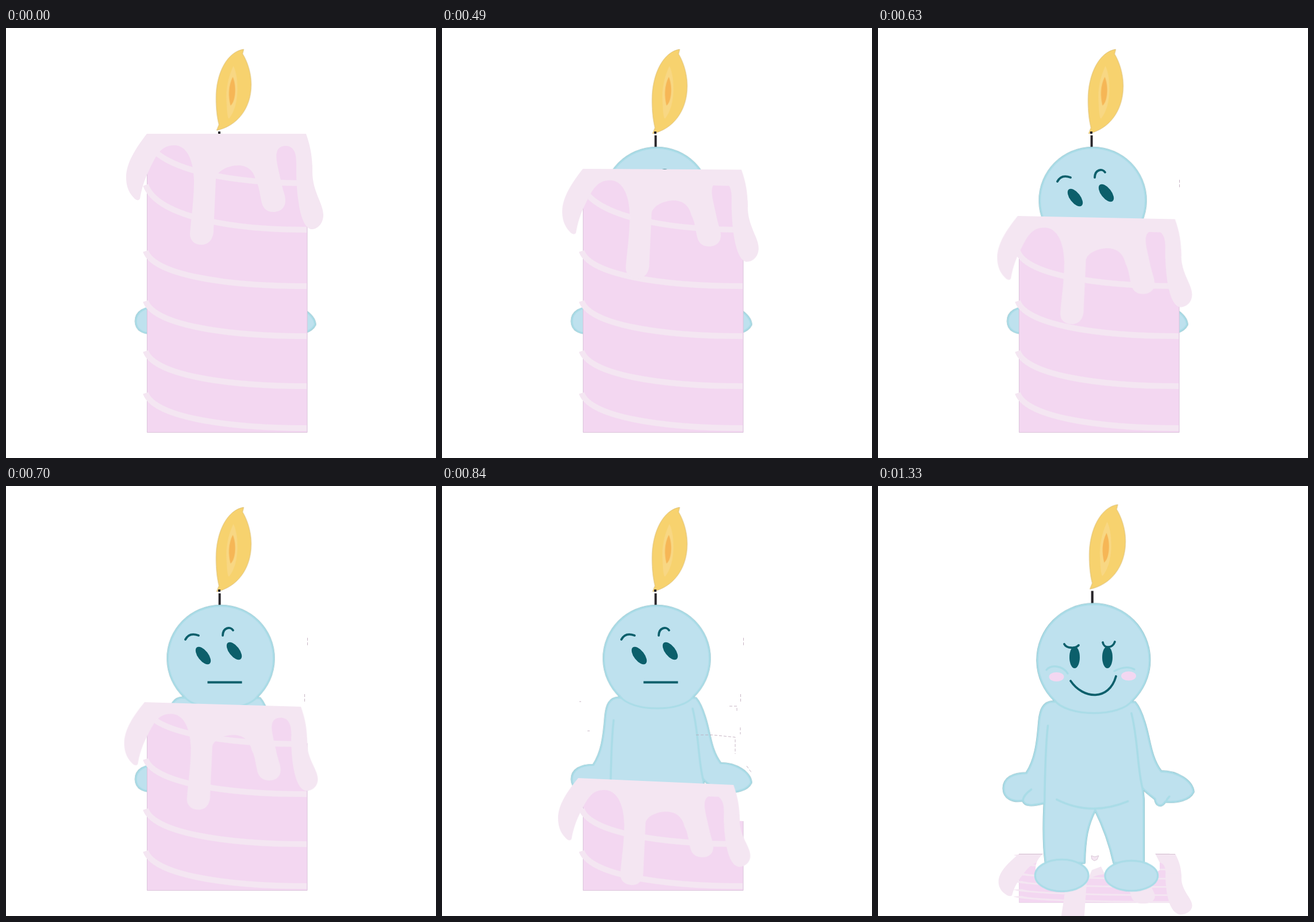
An HTML page that plays this animation: 748x748 px, repeating every 1.82 s.

```html
<!DOCTYPE html>
<html lang="en">
<head>
<meta charset="utf-8">
<title>Melting candle</title>
<style>
html, body { margin: 0; width: 100%; height: 100%; overflow: hidden; background: #fff; }
svg { display: block; width: 100vw; height: 100vh; }

.skin { fill: #bee1ee; stroke: #a9dce7; stroke-width: 3; stroke-linejoin: round; }
.edge { fill: none; stroke: #86b4bf; stroke-width: 4; stroke-linejoin: round; }
.line { fill: none; stroke: #a9dce7; stroke-width: 3.4; stroke-linecap: round; }
.ink { fill: #0c5f6b; }
.pen { fill: none; stroke: #0c5f6b; stroke-width: 3.8; stroke-linecap: round; }
.wax { fill: #f4e6f2; }
.stripes { fill: none; stroke: #f4e6f2; stroke-width: var(--band, 10px); }
.puddle { --band: 17px; }
.speck { fill: none; stroke: #b9a3b5; stroke-width: .8; stroke-dasharray: 5 3; }

/* Every pose is held, then switched at once. */
.anim { animation: 1820ms step-end infinite; }
.melt { animation-name: melt; }
.drip { animation-name: drip; transform-origin: 0 56px; }
.figure { animation-name: figure; }
.flame { animation-name: flame; }
.tongue { animation-name: tongue; transform-origin: 0 34px; }
.early { animation-name: early; }
.late { animation-name: late; }
.mid { animation-name: mid; }
.end { animation-name: end; }
.s1 { animation-name: s1; }
.s2 { animation-name: s2; }
.s3 { animation-name: s3; }

@keyframes melt {
  0%     { transform: translate(245px, 184px); }
  23.07% { transform: translate(245px, 212px) matrix(1, 0, 0, .995, 0, 0); }
  26.92% { transform: translate(245px, 245px) matrix(.996, .005, 0, .985, 0, 0); }
  30.76% { transform: translate(245px, 283px) matrix(.992, .011, 0, .975, 0, 0); }
  34.61% { transform: translate(243px, 327px) matrix(.988, .02, 0, .965, 0, 0); }
  38.46% { transform: translate(241px, 376px) matrix(.982, .029, 0, .955, 0, 0); }
  42.3%  { transform: translate(239px, 437px) matrix(.978, .036, 0, .95, 0, 0); }
  46.15%, 100% { transform: translate(237px, 508px) matrix(.975, .043, 0, .943, 0, 0); }
}
@keyframes drip {
  0%     { transform: none; }
  23.07% { transform: scaleY(.97); }
  30.76% { transform: scaleY(.93); }
  38.46% { transform: scaleY(.88); }
  46.15%, 100% { transform: scaleY(.86); }
}
@keyframes figure {
  0%     { transform: matrix(.974, 0, 0, .968, 6.3, 12.4); }
  50%    { transform: none; }
  73.07%, 100% { transform: matrix(1.031, 0, 0, 1.028, -13.9, -2.6); }
}
@keyframes flame {
  0%     { transform: translate(-4.5px, 3px); }
  50%    { transform: none; }
  73.07%, 100% { transform: matrix(1.031, 0, 0, 1.028, -13.9, -2.6); }
}
@keyframes tongue {
  0%     { transform: scaleY(.986); }
  23.07% { transform: scaleY(1.025); }
  50%, 100% { transform: none; }
}
@keyframes early { 0% { opacity: 1; } 50%, 100% { opacity: 0; } }
@keyframes late  { 0% { opacity: 0; } 50%, 100% { opacity: 1; } }
@keyframes mid   { 0% { opacity: 0; } 50% { opacity: 1; } 73.07%, 100% { opacity: 0; } }
@keyframes end   { 0% { opacity: 0; } 73.07%, 100% { opacity: 1; } }
@keyframes s1    { 0% { opacity: 0; } 30.76% { opacity: 1; } 50%, 100% { opacity: 0; } }
@keyframes s2    { 0% { opacity: 0; } 38.46% { opacity: 1; } 50%, 100% { opacity: 0; } }
@keyframes s3    { 0% { opacity: 0; } 46.15% { opacity: 1; } 50%, 100% { opacity: 0; } }
</style>
</head>
<body>
<svg viewBox="0 0 748 748">
  <defs>
    <path id="long" d="M243 273C262 325 380 351 523 351"/>
    <path id="short" d="M243 388C256 428 375 449 523 449"/>
    <g id="column">
      <path d="M245.5 184H524V703.5H245.5Z" fill="#f3d7f1" stroke="#d8c1d8" stroke-width=".9"/>
      <g class="stripes">
        <use href="#long" y="-81"/>
        <use href="#long"/>
        <use href="#short"/>
        <use href="#short" y="87"/>
        <use href="#short" y="174"/>
        <use href="#short" y="247"/>
      </g>
    </g>
    <!-- wax pieces are placed relative to the top left corner of the candle -->
    <path id="cap" class="wax" transform="translate(-245 -184)" d="M245 184H522C530 207 533 225 533 250L505 256C505 235 506 220 500 212C495 203 480 203 474 210C466 220 473 240 478 265C482 285 486 290 486 300C486 314 476 320 465 320C452 320 446 312 444 300C441 285 440 275 435 266C431 248 420 239 404 239C385 239 366 250 365 262C364 290 362 330 361 355C359 371 350 377 340 377C328 377 320 370 320 358C322 330 327 300 327 265C326 225 312 204 293 204C270 204 262 220 250 245C240 265 236 280 233 297C231 301 226 300 222 295C212 285 209 272 209 260C209 235 225 210 245 184Z"/>
    <path id="tail" class="wax" transform="translate(-245 -184)" d="M505 238H532.5L533 250C533 285 552 305 552 325C552 342 540 351 530 350C512 345 506 295 505 255Z"/>
    <path id="torso" d="M308 367.5C293 368.5 287.5 380 285.5 400C282.5 440 278.5 466 264 488.5C241 488.5 225.5 497 225.5 514C225.5 531 241 537.5 258 534.5C261 543.5 272 544.5 294.5 538.5C292.5 580 292.5 610 296.5 640H361.5C362.5 598 366.5 577 380 550.5C393 577 403.5 603 411.5 640H461.5V533L459.5 513C466 521 474 526 481 532C483 544 491 547 498 536.5C519 538.5 539 533.5 545.5 520C543.5 501.5 519 485.5 491 485.5C472.5 461 472.5 431 462.5 401C458.5 388 453.5 376 447 368.5Z"/>
    <path id="head" d="M311.4 365A94.5 94.5 0 1 1 442.6 365C424 394 332 394 311.4 365Z"/>
    <clipPath id="below">
      <path class="anim melt" d="M0 3H276L286 66H300V900H-10V70H0Z"/>
    </clipPath>
  </defs>

  <!-- melted puddle -->
  <g class="anim late puddle">
    <use href="#column" transform="translate(245 640) scale(.94 .163) translate(-245 -184)"/>
    <g transform="translate(245 640) scale(.982 .635)">
      <use href="#cap"/>
      <use href="#tail"/>
    </g>
    <path d="M245 640.5H517" stroke="#cdb9ca" stroke-width=".8"/>
  </g>
  <g class="anim end">
    <path fill="#fff" d="M288 639C278 648 274 655 274 668L290 690H355L367 680L372 668L388 662L394 674L420 680H480L487 670L490 668V655L482 639Z"/>
    <path class="wax" stroke="#cdb9ca" stroke-width=".7" d="M371 643L377 645L384 643L381 650L376 652L372 649Z"/>
  </g>

  <g class="anim figure">
    <path d="M375 180V203" stroke="#262328" stroke-width="4"/>
    <use class="edge" href="#torso"/>
    <use class="edge" href="#head"/>
    <use class="skin" href="#torso"/>
    <path class="line" d="M300 408C296 445 295 490 294.5 538M441 387C452 430 451 480 459.5 513M315 533Q372 562 435 536M272 516Q258 526 258 535M505 528Q501 532 499 537"/>
    <ellipse class="skin" cx="323.5" cy="661.5" rx="45" ry="27"/>
    <ellipse class="skin" cx="441" cy="662" rx="44.5" ry="25.5"/>
    <use class="skin" href="#head"/>
  </g>

  <!-- sideways glance -->
  <g class="anim early">
    <path class="pen" d="M312 267Q319 254 335 260M377 260C377 247 390 243 395 251"/>
    <ellipse class="ink" rx="9" ry="18" transform="translate(343 295) rotate(-38)"/>
    <ellipse class="ink" rx="9" ry="18" transform="translate(397 287) rotate(-38)"/>
    <path d="M350.5 341.5H410.5" stroke="#0c5f6b" stroke-width="3.8"/>
  </g>

  <!-- straight face -->
  <g class="anim mid">
    <path class="pen" d="M326 253Q338 239 351 251M388 250C391 237 408 238 408 249"/>
    <ellipse class="ink" cx="345" cy="292.5" rx="9" ry="18.5"/>
    <ellipse class="ink" cx="400.5" cy="292.5" rx="9" ry="18.5"/>
    <path d="M344.5 340.5H406.5" stroke="#0c5f6b" stroke-width="3.8"/>
  </g>

  <!-- smile -->
  <g class="anim end">
    <path class="line" d="M293 320C300 311 320 311 330 326M411 322Q432 311 446 319"/>
    <ellipse cx="310.5" cy="332" rx="13" ry="8" fill="#f3d7f1"/>
    <ellipse cx="436" cy="330.5" rx="13" ry="8" fill="#f3d7f1"/>
    <path class="pen" d="M324 275C328 283 344 283 349 277M391 272C393 283 408 283 412 271M335 339C357 371.5 402 374 414 331"/>
    <ellipse class="ink" cx="342" cy="298" rx="9" ry="19"/>
    <ellipse class="ink" cx="399" cy="298" rx="9" ry="19"/>
  </g>

  <g class="anim flame">
    <path class="anim tongue" fill="#f7d26e" stroke="#d3b15f" stroke-width=".7" d="M418 34C390 38 370 75 370 120C370 140 372 155 375 167L371 177C405 170 431 140 431 96C431 75 424 55 416 42Z"/>
    <path fill="#f8d783" d="M400 63C390 85 387 105 388 122C389 140 389 150 392 155C402 145 408 120 407 100C407 85 404 70 400 63Z"/>
    <path fill="#f6b656" d="M399 82C391 98 391 115 395 132C404 125 406 98 399 82Z"/>
  </g>

  <!-- sinking candle -->
  <g class="anim early">
    <path d="M369 180h4v4h-4z" fill="#262328"/>
    <g clip-path="url(#below)"><use href="#column"/></g>
    <g class="anim melt">
      <use href="#cap"/>
      <g class="anim drip"><use href="#tail"/></g>
    </g>
  </g>

  <path class="anim speck s1" d="M524.5 264V280"/>
  <path class="anim speck s2" d="M519.5 362V376"/>
  <path class="anim speck s3" d="M500 383H513V394M442 433H470L510 437V466M519 420V432M239 375H242M253 426H257M530 487L538 498"/>
</svg>
</body>
</html>
```
